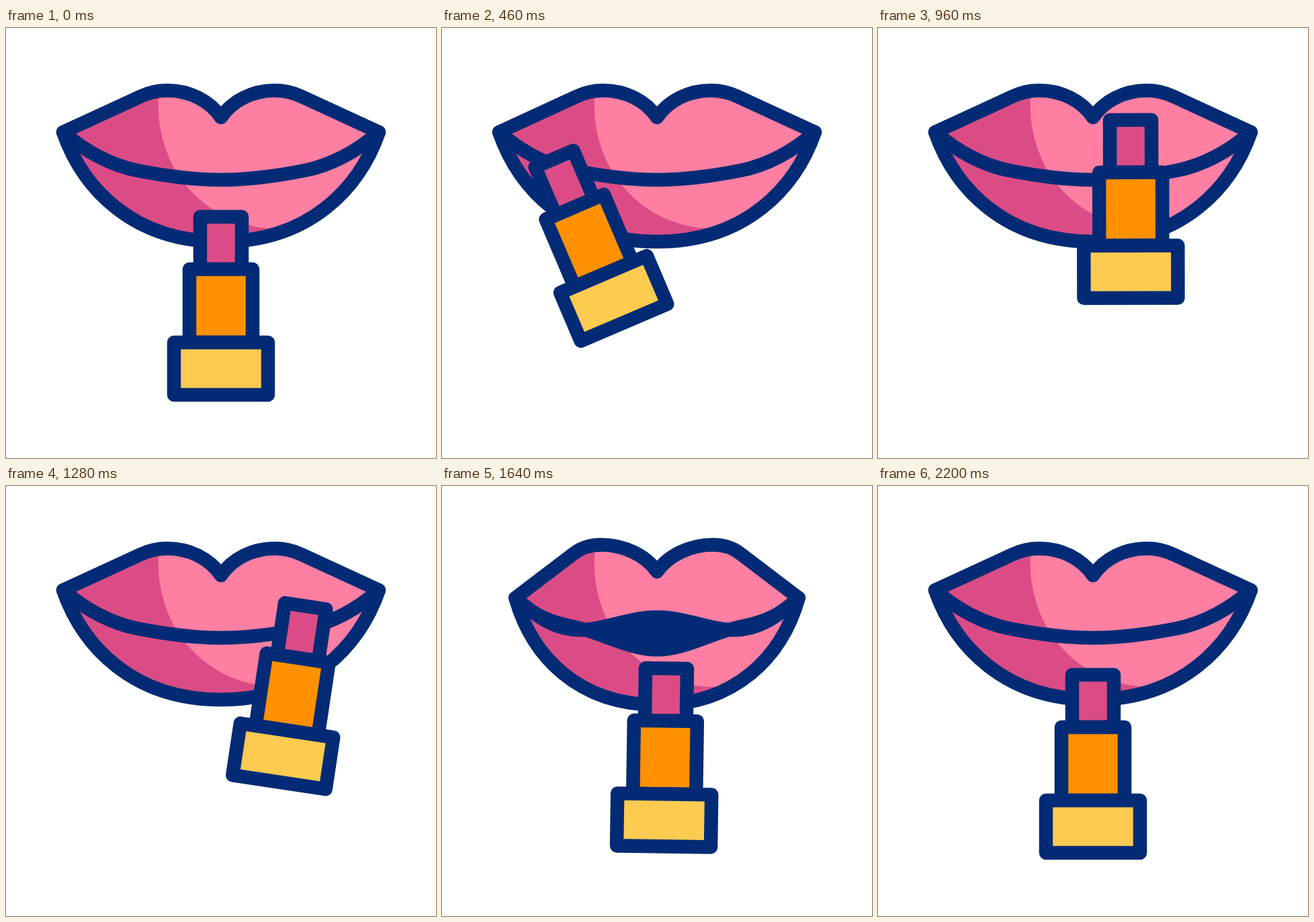
Recreate the animation shown at these times as an HTML page with a canvas. Size 640 by 640 pixels, loop 2400 ms.

```html
<!DOCTYPE html>
<html lang="en">
<head>
<meta charset="utf-8">
<title>Lips and lipstick</title>
<style>
  html, body { margin: 0; width: 100%; height: 100%; overflow: hidden; background: #fff; }
  canvas { display: block; width: 640px; height: 640px; }
</style>
</head>
<body>
<canvas id="stage" width="640" height="640"></canvas>
<script>
const ctx = document.getElementById('stage').getContext('2d');
const LOOP = 2400;
const NAVY = '#032b75', PINK = '#ff7fa2', ROSE = '#db4c86', ORANGE = '#ff9100', YELLOW = '#fdcb50';

const mix = (a, b, u) => a + (b - a) * u;
const clamp = v => Math.max(0, Math.min(1, v));
const radians = degrees => degrees * Math.PI / 180;

// Lipstick stops, relative to its resting place; bow bends the way that follows
const rest = { time: 0, x: 0, y: 0, angle: 0, bow: [-18.7, -2.4] };
const stops = [
  rest,
  { time: 540, x: -107.5, y: -112.5, angle: -27.1, bow: [-8, -11] },
  { time: 1140, x: 136, y: -144.5, angle: 11.5, bow: [7, 4.3] },
  { ...rest, time: 1680 }
];

function lipstickPose(t) {
  const next = stops.findIndex(stop => stop.time > t);
  if (next < 0) return rest;
  const a = stops[next - 1], b = stops[next];
  const u = (t - a.time) / (b.time - a.time);
  const arch = 4 * u * (1 - u);
  return {
    x: mix(a.x, b.x, u) + a.bow[0] * arch,
    y: mix(a.y, b.y, u) + a.bow[1] * arch,
    angle: mix(a.angle, b.angle, u)
  };
}

// 0 is closed, 1 is open, with a slight stretch beyond
const opening = t => 1.2 * clamp(Math.min((t - 1420) / 240, (2140 - t) / 360));

// Completes a left half with its mirror image
function mirrored(d) {
  const half = new Path2D(d);
  const whole = new Path2D(half);
  whole.addPath(half, new DOMMatrix([-1, 0, 0, 1, 640, 0]));
  return whole;
}

const corner = open => [85 + 22 * open, 155 + 10.5 * open];

// From the bottom centre round the corner to the cleft
function lipOutline(open) {
  const [x, y] = corner(open);
  const bottom = 318 + 7 * open;
  const peakX = 240 - 3 * open, peakY = 93 - 5 * open;
  const cleft = 133 - 5 * open;
  return mirrored(`M320 ${bottom} C${188 + 14 * open} ${bottom} ${x + 29 - 4 * open} ${y + 83 + 4 * open} ${x} ${y}
    L${200 - 4 * open} ${102 - open} Q${219 - 6 * open} ${peakY} ${peakX} ${peakY}
    C${peakX + 33} ${peakY} 303 ${cleft - 25} 320 ${cleft}`);
}

// From the lower centre out to the corner and back to the upper centre
function mouthOutline(open) {
  const [x, y] = corner(open);
  const low = 226 + 16 * open, high = 226 - 28 * open;
  const lowX = 195 + 2 * open, lowY = 212 - 2 * open;
  const highX = 195 + 11 * open, highY = 212 + 2 * open;
  const slope = 7.5 * (1 - open);
  return mirrored(`M320 ${low} C278 ${low} ${lowX + 38} ${lowY + 7.5} ${lowX} ${lowY}
    S${x + 31} ${y + 28} ${x} ${y}
    C${x + 33} ${y + 29} ${highX - 38} ${highY - slope} ${highX} ${highY}
    S278 ${high} 320 ${high}`);
}

const shade = new Path2D('M0 40H227V104C222 200 285 290 395 299H430V360H0Z');

function drawLips(open) {
  const lips = lipOutline(open), mouth = mouthOutline(open);
  ctx.fillStyle = PINK;
  ctx.fill(lips);
  ctx.save();
  ctx.clip(lips);
  ctx.fillStyle = ROSE;
  ctx.fill(shade);
  ctx.restore();
  ctx.stroke(lips);
  ctx.fillStyle = NAVY;
  ctx.fill(mouth);
  ctx.stroke(mouth);
}

function block(top, width, height, color) {
  ctx.fillStyle = color;
  ctx.fillRect(-width / 2, top, width, height);
  ctx.strokeRect(-width / 2, top, width, height);
}

function drawLipstick({ x, y, angle }) {
  ctx.save();
  ctx.translate(320 + x, 413.5 + y);
  ctx.rotate(radians(angle));
  block(-132.5, 62, 78, ROSE);
  block(-54.5, 94, 109, ORANGE);
  block(54.5, 140, 78, YELLOW);
  ctx.restore();
}

const halfHeart = 'M0 52C30 32 53 10 53 -18C53 -36 42 -49 27 -49C14 -49 5 -46 0 -38';
const heart = new Path2D(halfHeart);
heart.addPath(new Path2D(halfHeart), new DOMMatrix([-1, 0, 0, 1, 0, 0]));

// Swells, turns upright, shrinks a little, then vanishes at once
function drawHeart(t) {
  if (t <= 1680 || t >= 2195) return;
  const u = (t - 1680) / 480;
  const size = 1.87 * Math.sin(2.15 * u) ** 1.5;
  ctx.save();
  ctx.translate(mix(493, 505, u), mix(137, 139, u));
  ctx.rotate(radians(45 * (1 - u)));
  ctx.scale(size, size);
  ctx.fillStyle = YELLOW;
  ctx.fill(heart);
  ctx.restore();
}

function draw(t) {
  ctx.fillStyle = '#fff';
  ctx.fillRect(0, 0, 640, 640);
  ctx.strokeStyle = NAVY;
  ctx.lineWidth = 20.5;
  ctx.lineJoin = ctx.lineCap = 'round';
  drawLips(opening(t));
  drawLipstick(lipstickPose(t));
  drawHeart(t);
}

let start = null;
function tick(now) {
  start ??= now;
  draw((now - start) % LOOP);
  requestAnimationFrame(tick);
}
draw(0);
requestAnimationFrame(tick);
</script>
</body>
</html>
```
